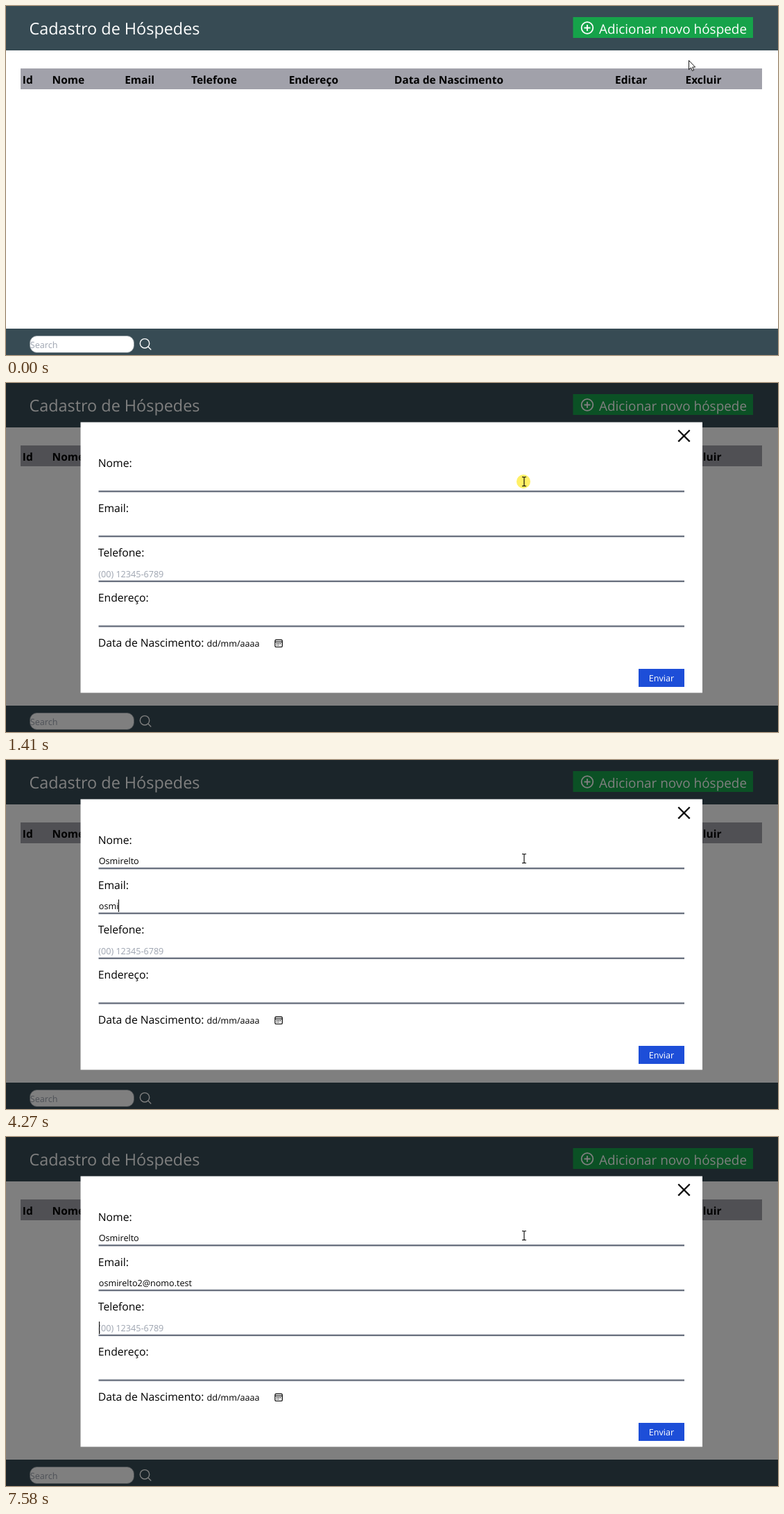
Recreate the animation shown at these times as an HTML page. Size 1113 by 503 pixels, loop 8000 ms.

```html
<!DOCTYPE html>
<html lang="pt-BR">
<head>
<meta charset="utf-8">
<title>Cadastro de Hóspedes</title>
<style>
  html, body { margin: 0; width: 100%; height: 100%; overflow: hidden; background: #fff; }
  svg { display: block; width: 100%; height: 100%; font-family: "Open Sans", "Noto Sans", sans-serif; text-rendering: geometricPrecision; }
  .title { font-size: 23.4px; fill: #fff; }
  .add { font-size: 18.9px; fill: #fff; }
  .head { font-size: 15.5px; font-weight: 700; }
  .label { font-size: 15.7px; }
  .input { font-size: 12.6px; }
  .hint { fill: #9ca3af; }
  .send { fill: #fff; text-anchor: middle; }
  .icon { fill: none; stroke: #fff; }
</style>
</head>
<body>
<svg viewBox="0 0 1113 503" xmlns="http://www.w3.org/2000/svg">
  <rect width="1113" height="503" fill="#fff"/>
  <rect width="1113" height="64" fill="#374b54"/>
  <rect y="465" width="1113" height="38" fill="#374b54"/>
  <text class="title" x="33.5" y="41">Cadastro de Hóspedes</text>

  <rect x="817.5" y="16" width="259.5" height="30" fill="#16a34a"/>
  <g class="icon" stroke-width="1.8">
    <circle cx="838" cy="31.5" r="8.3"/>
    <path d="M833.5 31.5h9M838 27v9"/>
  </g>
  <text class="add" x="855" y="39.5">Adicionar novo hóspede</text>

  <rect x="21" y="90" width="1069" height="30" fill="#a1a1aa"/>
  <g id="heads"></g>

  <rect x="34.5" y="475.5" width="150" height="24" rx="10" fill="#fff" stroke="#8b959b" stroke-width=".8"/>
  <text class="input hint" x="34.8" y="492.5">Search</text>
  <g class="icon" stroke-width="1.4">
    <circle cx="200" cy="486.3" r="6.7"/>
    <path d="M204.8 491.1l4.4 4.4"/>
  </g>

  <g id="modal">
    <rect width="1113" height="503" fill="#000" fill-opacity=".5"/>
    <rect x="107.5" y="56.5" width="896.5" height="390" fill="#fff"/>
    <path d="M969.3 68l16.4 16.4m0-16.4l-16.4 16.4" stroke="#000" stroke-width="2.2"/>
    <g id="fields"></g>
    <text class="label" x="132.8" y="380">Data de Nascimento:</text>
    <text class="input" x="289.5" y="380">dd/mm/aaaa</text>
    <g fill="none" stroke="#000" stroke-width="1.2">
      <rect x="387.9" y="370.1" width="10.4" height="10.4" rx="1.6"/>
      <path d="M388 373.1h10"/>
      <path d="M390 375.6h6.4M390 378h4" stroke-dasharray="1.4 1"/>
    </g>
    <rect x="912" y="412" width="66" height="26" fill="#1d4ed8"/>
    <text class="input send" x="945" y="430">Enviar</text>
    <text class="input" id="name" x="133.8" y="150"></text>
    <text class="input" id="email" x="133.8" y="215"></text>
    <rect id="caret" width="1" height="18" fill="#000"/>
  </g>

  <circle id="ripple" r="10" fill="#ffe600" fill-opacity=".6"/>
  <path id="arrow" d="M.5 .5V13.6L3.5 10.9L5.5 15.4L7.6 14.5L5.7 10.1H9.7Z" fill="#fff" stroke="#000" stroke-width=".9"/>
  <path id="beam" d="M-3 -6.5H-1Q0 -6.5 0 -5.5Q0 -6.5 1 -6.5H3M0 -5.5V5.5M-3 6.5H-1Q0 6.5 0 5.5Q0 6.5 1 6.5H3" fill="none" stroke="#000" stroke-width="1.1"/>
</svg>
<script>
const LOOP = 8000;
const OPEN = 750;
const $ = id => document.getElementById(id);

$("heads").innerHTML = [
  ["Id", 23.8], ["Nome", 66.6], ["Email", 171.2], ["Telefone", 267],
  ["Endereço", 407.7], ["Data de Nascimento", 559.8], ["Editar", 878], ["Excluir", 979.5]
].map(([text, x]) => `<text class="head" x="${x}" y="111.5">${text}</text>`).join("");

const ROW = 64.8;
$("fields").innerHTML = ["Nome", "Email", "Telefone", "Endereço"].map((text, i) => `
  <text class="label" x="132.8" y="${120.7 + i * ROW}">${text}:</text>
  <rect x="133.5" y="${155 + i * ROW}" width="844.5" height="2.4" fill="#6b7280"/>`).join("") +
  `<text class="input hint" x="133.3" y="279.6">(00) 12345-6789</text>`;

const typed = {
  name: {
    text: "Osmirelto",
    keys: [2210, 2480, 2580, 2680, 2820, 3080, 3220, 3350, 3480]
  },
  email: {
    text: "osmirelto2@nomo.test",
    keys: [3810, 4010, 4070, 4270, 4400, 4530, 4730, 4840, 4950, 5060,
           5460, 5820, 6010, 6210, 6270, 6530, 6730, 6860, 6990, 7320]
  }
};

// Pointer stops: time, x, y
const stops = [
  [0, 984, 78], [180, 981, 71], [250, 974, 56], [320, 966, 39],
  [390, 960, 27], [460, 958, 24], [530, 963, 36],
  [870, 957, 41], [950, 930, 60], [1030, 880, 89], [1110, 822, 117],
  [1180, 776, 134], [1260, 753, 141], [1340, 747, 142]
];

const show = (id, on) => $(id).setAttribute("visibility", on ? "visible" : "hidden");
const move = (id, x, y) => $(id).setAttribute("transform", `translate(${x} ${y})`);

function type(id, t) {
  const { text, keys } = typed[id];
  const value = text.slice(0, keys.filter(k => t >= k).length);
  const node = $(id);
  if (node.textContent !== value) node.textContent = value;
  return value ? node.getComputedTextLength() : 0;
}

function drawCaret(t, widths) {
  const row = t < 3680 ? 0 : t < 7580 ? 1 : 2;
  move("caret", Math.round(133.8 + widths[row]), 136 + row * 65);
  show("caret", t >= 1480 && !(t >= 1950 && t < 2210));
}

function drawPointer(t) {
  const [, x, y] = stops.filter(s => t >= s[0]).pop();
  const overInput = y > 135;
  move("arrow", x, y);
  move("beam", x, y);
  show("arrow", !overInput);
  show("beam", overInput);
  move("ripple", x - 1, y);
  show("ripple", (t >= 670 && t < OPEN) || (t >= 1410 && t < 1480));
}

function draw(t) {
  $("modal").setAttribute("display", t >= OPEN ? "inline" : "none");
  drawCaret(t, [type("name", t), type("email", t), 0]);
  drawPointer(t);
}

const start = performance.now();
function tick() {
  draw((performance.now() - start) % LOOP);
  requestAnimationFrame(tick);
}
tick();
</script>
</body>
</html>
```
